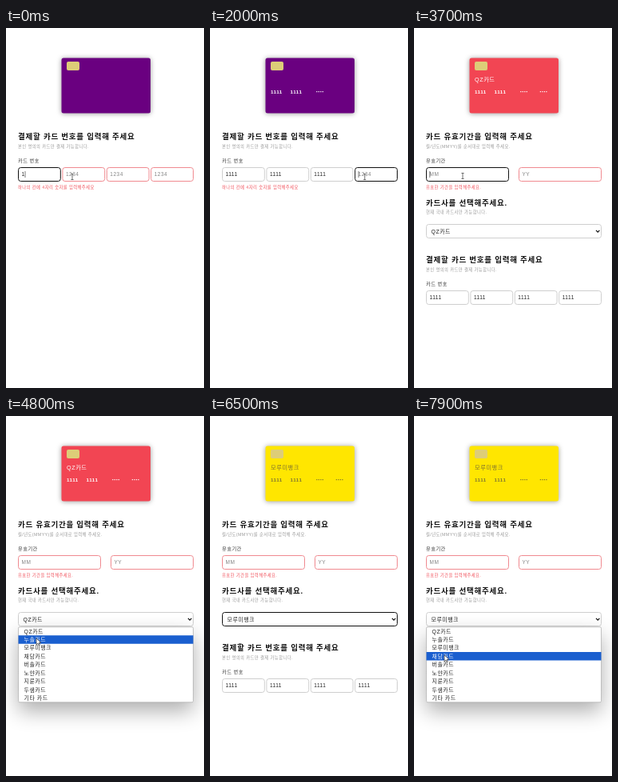
An HTML page with a canvas for the animation above (8 s loop, 248 px wide and 450 px high).

```html
<!DOCTYPE html>
<html lang="ko">
<head>
<meta charset="utf-8">
<title>카드 등록</title>
<style>
html, body { margin: 0; width: 100%; height: 100%; overflow: hidden; background: #fff; }
canvas { display: block; width: 248px; height: 450px; }
</style>
</head>
<body>
<canvas id="stage"></canvas>
<script>
const W = 248, H = 450, LOOP = 8000, STEP = 100;
const FONT = '"Liberation Sans", "Noto Sans CJK KR", "Noto Sans CJK", sans-serif';
const RED = '#f08a90', ERROR = '#f0525c', GRAY = '#cfcfcf', INK = '#222';
const ISSUERS = ['QZ카드', '누솔카드', '모루미뱅크', '채담카드', '버솔카드', '노얀카드', '지룬카드', '두샘카드', '기타 카드'];
const CARD_COLORS = ['#f24553', '#0046ff', '#ffe600'];

const TOP = 135.5, EXPIRY_HEIGHT = 82.5, SELECT_HEIGHT = 71.5, LIST_OFFSET = 45.8, ROW = 10.42;
const FIELD_PITCH = 55.4, FIELD_FOCUS = 650, FIELD_TYPING = 750, KEY_TIME = 100, CARD_LAG = 100;
const SELECT_SHOWN = 2600;

// Each pick opens the list, glides to an option and closes the list on it.
const PICKS = [
  { open: 3000, close: 3500 },
  { open: 4500, close: 4900 },
  { open: 5200, close: 6400 },
  { open: 7500, close: 8300 },
];
const EXPIRY_SHOWN = PICKS[0].close;
const selectTop = t => TOP + (t >= EXPIRY_SHOWN ? EXPIRY_HEIGHT : 0);

const stops = [1, 2, 3].map(i => ({
  from: i * FIELD_FOCUS - 400, to: i * FIELD_FOCUS, x: 83 + (i - 1) * FIELD_PITCH, y: 186,
}));
PICKS.forEach(({ open, close }, i) => {
  const x = i ? 38 : 61, top = selectTop(open), middle = (open + close) / 2;
  const previousClose = i ? PICKS[i - 1].close : 0;
  stops.push({ from: Math.max(previousClose, open - 500), to: open - 100, x, y: top + 36, arrow: true });
  stops.push({ from: Math.max(open, middle - 400), to: middle, x, y: top + LIST_OFFSET + (i + 0.35) * ROW });
});

const canvas = document.getElementById('stage');
const ctx = canvas.getContext('2d');
const ratio = window.devicePixelRatio || 1;
canvas.width = W * ratio;
canvas.height = H * ratio;

const clamp = (value, low, high) => Math.min(high, Math.max(low, value));
const typed = (field, t) => clamp(Math.floor((t - field * FIELD_TYPING) / KEY_TIME) + 1, 0, 4);

function pointerAt(t) {
  const i = Math.max(0, stops.filter(stop => stop.from <= t).length - 1);
  const stop = stops[i], start = stops[i - 1] || stop;
  const ease = 1 - (1 - clamp((t - stop.from) / (stop.to - stop.from), 0, 1)) ** 3;
  return { x: start.x + (stop.x - start.x) * ease, y: start.y + (stop.y - start.y) * ease, arrow: stop.arrow };
}

// y is the vertical middle of the glyphs
function text(str, x, y, size, color = INK, weight = 400) {
  ctx.font = `${weight} ${size}px ${FONT}`;
  ctx.letterSpacing = `${size * 0.08}px`;
  ctx.fillStyle = color;
  ctx.fillText(str, x, y + size * 0.37);
}

function box(x, y, w, h, r, fill, stroke, line = 1) {
  ctx.beginPath();
  ctx.roundRect(x, y, w, h, r);
  if (fill) { ctx.fillStyle = fill; ctx.fill(); }
  if (stroke) { ctx.strokeStyle = stroke; ctx.lineWidth = line; ctx.stroke(); }
}

function shadowBox(x, y, w, h, r, fill, drop, blur, alpha) {
  ctx.save();
  ctx.shadowColor = `rgba(0,0,0,${alpha})`;
  ctx.shadowOffsetY = drop * ratio;
  ctx.shadowBlur = blur * ratio;
  box(x, y, w, h, r, fill);
  ctx.restore();
}

function heading(y, title, note) {
  text(title, 15, y, 9.5, '#111', 700);
  text(note, 15, y + 12.5, 5.3, '#999');
}

function input(x, y, w, value, hint, focused) {
  box(x + 0.5, y - 8.5, w - 1, 17, 3, '#fff', focused ? '#111' : value ? GRAY : RED);
  text(value || hint, x + 4.5, y, 6.5, value ? INK : '#858585');
  if (focused) {
    const caret = x + 4.5 + (value ? ctx.measureText(value).width : 0);
    ctx.fillStyle = '#444';
    ctx.fillRect(caret, y - 4, 0.7, 8);
  }
}

function drawCard(t, issuer) {
  const ink = issuer === 2 ? '#7d7230' : '#fff';
  shadowBox(69.5, 37.5, 111.5, 69, 2.5, CARD_COLORS[issuer] || '#6a0080', 0.5, 6, 0.4);
  box(76, 42, 16, 11, 2, '#ddcd78');
  if (issuer >= 0) text(ISSUERS[issuer], 76, 64, 7.2, ink);
  for (let field = 0; field < 4; field++) {
    const x = 76 + field * 24.6, count = typed(field, t - CARD_LAG);
    if (field < 2) {
      text('1'.repeat(count), x, 79.5, 6.2, ink, 700);
    } else {
      ctx.fillStyle = ink;
      for (let d = 0; d < count; d++) ctx.fillRect(x + 8 + d * 2.5, 79, 1.2, 1.2);
    }
  }
}

function drawNumbers(t, y, focus, error) {
  heading(y, '결제할 카드 번호를 입력해 주세요', '본인 명의의 카드만 결제 가능합니다.');
  text('카드 번호', 15, y + 30.5, 6.2, '#333');
  for (let field = 0; field < 4; field++) {
    input(15 + field * FIELD_PITCH, y + 47.5, 53.8, '1'.repeat(typed(field, t)), '1234', focus === field);
  }
  if (error) text('하나의 칸에 4자리 숫자를 입력해주세요', 15, y + 64, 5.3, ERROR);
}

function drawExpiry(y, focus) {
  heading(y, '카드 유효기간을 입력해 주세요', '월/년도(MMYY)를 순서대로 입력해 주세요.');
  text('유효기간', 15, y + 30.5, 6.2, '#333');
  input(15, y + 47.5, 104, '', 'MM', focus === 'month');
  input(131, y + 47.5, 104, '', 'YY', false);
  text('유효한 기간을 입력해주세요.', 15, y + 64, 5.3, ERROR);
}

function drawSelect(y, issuer, focused) {
  heading(y, '카드사를 선택해주세요.', '현재 국내 카드사만 가능합니다.');
  const middle = y + 36;
  box(15.5, middle - 8.5, 219, 17, 3, '#fff', focused ? '#111' : GRAY);
  text(ISSUERS[issuer] || '카드사를 선택해주세요', 21.5, middle, 6.9);
  ctx.beginPath();
  ctx.moveTo(228, middle - 1.2);
  ctx.lineTo(230.2, middle + 1.2);
  ctx.lineTo(232.4, middle - 1.2);
  ctx.strokeStyle = '#111';
  ctx.lineWidth = 1.2;
  ctx.stroke();
}

function drawList(top, highlight) {
  shadowBox(15.5, top, 219, 94, 1.5, '#fff', 11, 26, 0.32);
  box(15.5, top, 219, 94, 1.5, '#fff', '#aaa', 0.7);
  ISSUERS.forEach((name, i) => {
    const on = i === highlight;
    if (on) box(15.5, top + i * ROW, 219, ROW, 0, '#1a5fcf');
    text(name, 22.5, top + (i + 0.5) * ROW, 6.9, on ? '#fff' : INK);
  });
}

function drawPointer({ x, y }, arrow) {
  ctx.beginPath();
  if (arrow) {
    const points = [[0, 0], [0, 8], [1.9, 6.3], [3.1, 9], [4.4, 8.4], [3.2, 5.8], [5.8, 5.6]];
    points.forEach(([dx, dy]) => ctx.lineTo(x + dx, y + dy));
    ctx.closePath();
    ctx.fillStyle = '#fff';
    ctx.fill();
  } else {
    for (const dy of [-3.5, 3.5]) {
      ctx.moveTo(x - 1.6, y + dy);
      ctx.lineTo(x + 1.6, y + dy);
    }
    ctx.moveTo(x, y - 3.5);
    ctx.lineTo(x, y + 3.5);
  }
  ctx.strokeStyle = '#333';
  ctx.lineWidth = 0.7;
  ctx.stroke();
}

function draw(t) {
  const issuer = PICKS.filter(pick => pick.close <= t).length - 1;
  const open = PICKS.some(pick => pick.open <= t && t < pick.close);
  const pointer = pointerAt(t), selectY = selectTop(t), listY = selectY + LIST_OFFSET;
  const hasSelect = t >= SELECT_SHOWN;
  let focus = null;
  if (!hasSelect) focus = Math.floor(t / FIELD_FOCUS);
  else if (!open && issuer >= 0) focus = issuer ? 'select' : 'month';

  ctx.setTransform(ratio, 0, 0, ratio, 0, 0);
  ctx.fillStyle = '#fff';
  ctx.fillRect(0, 0, W, H);
  drawCard(t, issuer);
  if (t >= EXPIRY_SHOWN) drawExpiry(TOP, focus);
  if (hasSelect) drawSelect(selectY, issuer, focus === 'select');
  drawNumbers(t, selectY + (hasSelect ? SELECT_HEIGHT : 0), focus, !hasSelect);
  if (open) {
    const hovered = Math.floor((pointer.y - listY) / ROW);
    drawList(listY, hovered >= 0 ? hovered : Math.max(0, issuer));
  }
  drawPointer(pointer, open || pointer.arrow);
}

function tick(now) {
  draw(Math.floor((now % LOOP) / STEP) * STEP);
  requestAnimationFrame(tick);
}
requestAnimationFrame(tick);
</script>
</body>
</html>
```
